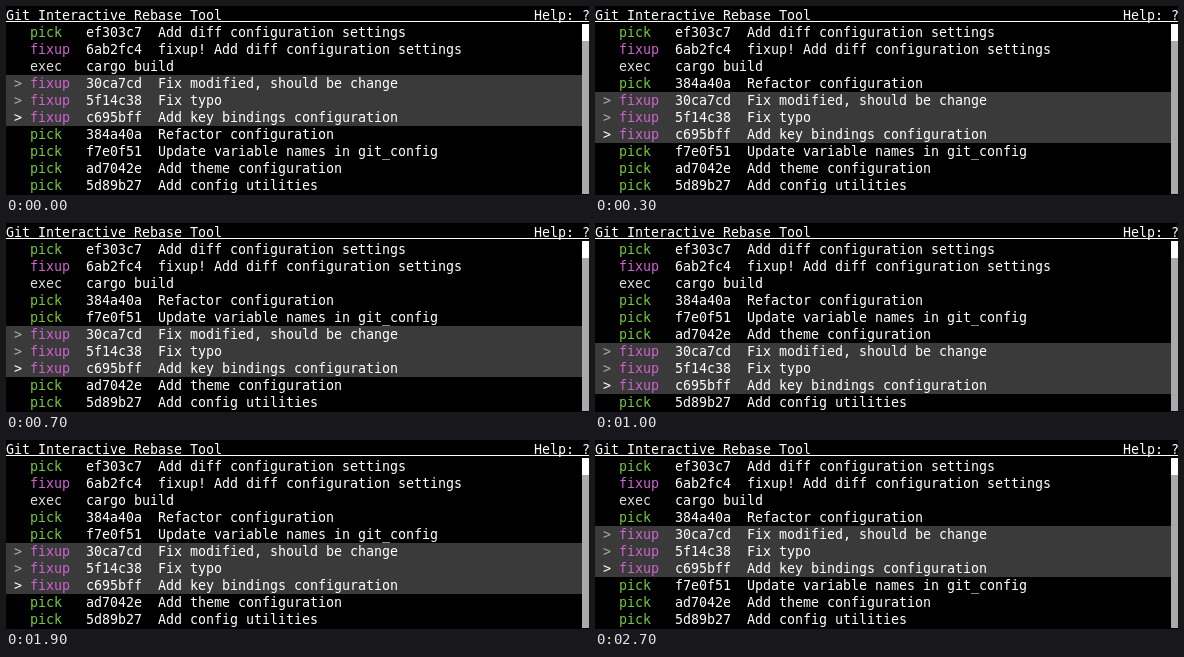
An HTML page with a canvas for the animation above (2.8 s loop, 583x189 px).

```html
<!DOCTYPE html>
<html lang="en">
<head>
<meta charset="utf-8">
<title>Git Interactive Rebase Tool</title>
<style>
  html, body { margin: 0; width: 100%; height: 100%; overflow: hidden; background: #000; }
  canvas { display: block; }
</style>
</head>
<body>
<canvas id="stage" width="583" height="189"></canvas>
<script>
const canvas = document.getElementById('stage');
const ctx = canvas.getContext('2d');

const CELL = 8, LINE = 17, TOP = 1, ASCENT = 13, LIST_WIDTH = 576;
const LOOP = 2800, FIRST = 3;
const WHITE = '#fff', DIM = '#aaa', BAND = '#3a3a3a';
const ACTION_COLORS = { pick: '#73c936', fixup: '#cf62cf', exec: '#ddd' };

const head = [
  ['pick', 'ef303c7', 'Add diff configuration settings'],
  ['fixup', '6ab2fc4', 'fixup! Add diff configuration settings'],
  ['exec', 'cargo build', '']
];
const block = [
  ['fixup', '30ca7cd', 'Fix modified, should be change'],
  ['fixup', '5f14c38', 'Fix typo'],
  ['fixup', 'c695bff', 'Add key bindings configuration']
];
const rest = [
  ['pick', '384a40a', 'Refactor configuration'],
  ['pick', 'f7e0f51', 'Update variable names in git_config'],
  ['pick', 'ad7042e', 'Add theme configuration'],
  ['pick', '5d89b27', 'Add config utilities']
];

// [start time, rows the selected block has moved down]
const moves = [[0, 0], [200, 1], [600, 2], [1000, 3], [1900, 2], [2300, 1]];

const rowTop = row => TOP + row * LINE;

function rect(x, y, w, h, color) {
  ctx.fillStyle = color;
  ctx.fillRect(x, y, w, h);
}

// Each glyph sits in its own terminal cell.
function print(text, col, row, color) {
  ctx.fillStyle = color;
  [...text].forEach((ch, i) => ctx.fillText(ch, (col + i) * CELL, rowTop(row) + ASCENT));
}

function drawTitle() {
  print('Git Interactive Rebase Tool', 0, 0, WHITE);
  print('Help: ?', 66, 0, WHITE);
  rect(0, 15, canvas.width, 1, WHITE);
}

function drawScrollbar() {
  const width = canvas.width - LIST_WIDTH;
  rect(LIST_WIDTH, rowTop(1), width, LINE, WHITE);
  rect(LIST_WIDTH, rowTop(2), width, LINE * 9, DIM);
}

function draw(shift) {
  rect(0, 0, canvas.width, canvas.height, '#000');
  drawTitle();
  const start = FIRST + shift;
  rect(0, rowTop(start + 1), LIST_WIDTH, LINE * block.length, BAND);
  const lines = [...head, ...rest.slice(0, shift), ...block, ...rest.slice(shift)];
  lines.forEach(([action, ref, message], i) => {
    const row = i + 1, pos = i - start;
    if (pos >= 0 && pos < block.length) {
      print('>', 1, row, pos === block.length - 1 ? WHITE : DIM);
    }
    print(action, 3, row, ACTION_COLORS[action]);
    print(ref, 10, row, WHITE);
    print(message, 19, row, WHITE);
  });
  drawScrollbar();
}

function frame() {
  const t = performance.now() % LOOP;
  draw(moves.filter(([start]) => start <= t).pop()[1]);
  requestAnimationFrame(frame);
}

ctx.font = '13.333px "DejaVu Sans Mono", monospace';
ctx.textBaseline = 'alphabetic';
frame();
</script>
</body>
</html>
```
